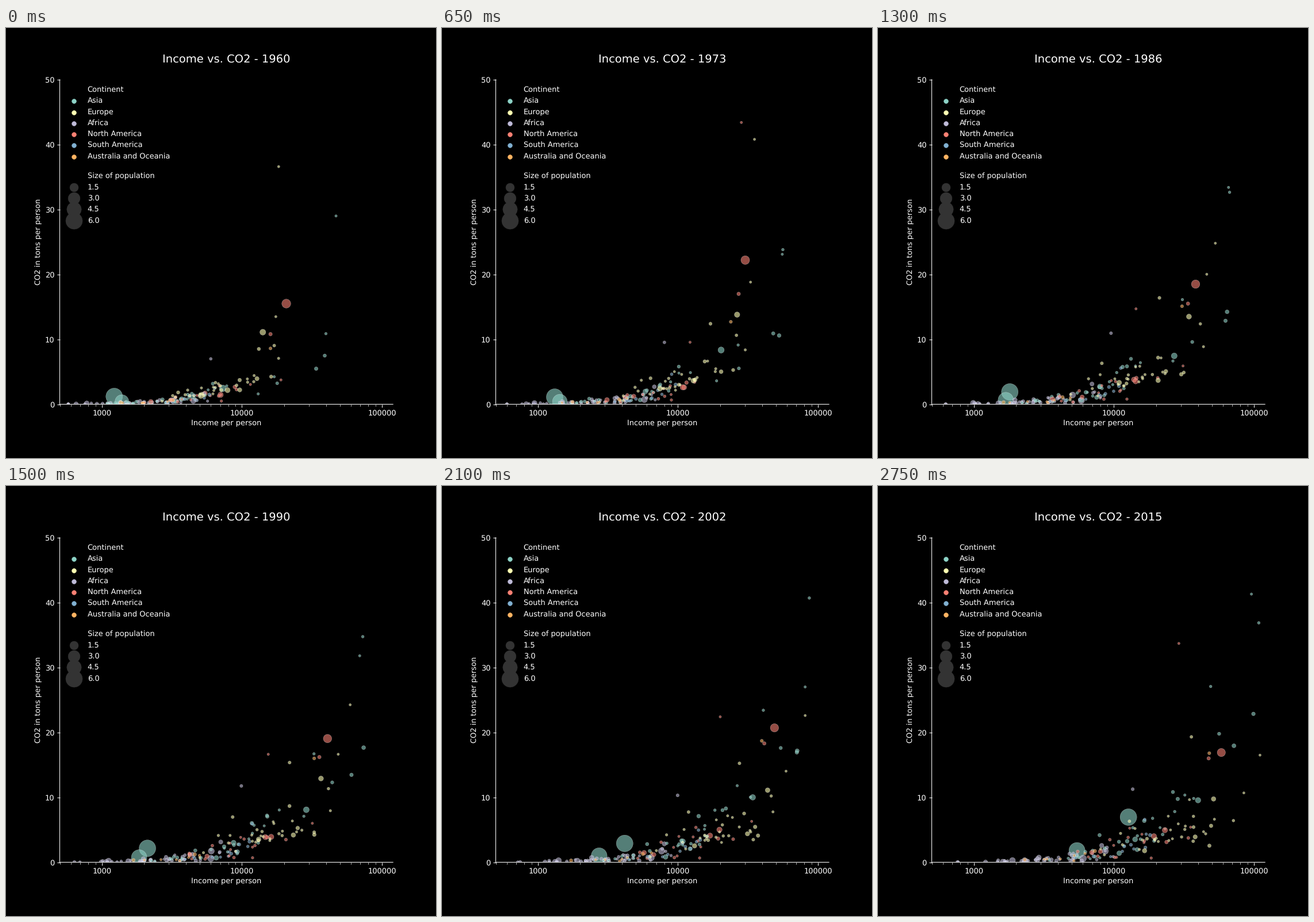
Write a matplotlib script that moves like this. It is 748 px wide and 748 px high and loops after 2800 ms.

```python
import numpy as np
import matplotlib.pyplot as plt
from matplotlib import ticker
from matplotlib.animation import FuncAnimation

SIDE, DPI = 748, 93.5
FIRST_YEAR, YEARS = 1960, 56
T = np.linspace(0, 1, YEARS)

ASIA, EUROPE, AFRICA, NORTH, SOUTH, OCEANIA = range(6)
NAMES = ["Asia", "Europe", "Africa", "North America", "South America",
         "Australia and Oceania"]
COLORS = ["#8dd3c7", "#feffb3", "#bfbbd9", "#fa8174", "#81b1d2", "#fdb462"]

rng = np.random.default_rng(12)
incomes, emissions, people, groups = [], [], [], []


def add(group, log_income, co2, start_pop, end_pop):
    groups.append(group)
    incomes.append(10 ** log_income)
    emissions.append(co2)
    people.append(np.linspace(start_pop, end_pop, YEARS))


def leader(group, pops, start, end, ease, *co2):
    """A country that stands out: eased income, emissions through key years."""
    a, b = np.log10([start, end])
    keys = np.array([0, 13, 26, 42, 55]) / 55
    add(group, a + (b - a) * T ** ease, np.interp(T, keys, co2), *pops)


def crowd(group, count, start, end, spread, levels, noise, growth):
    """Countries that drift along a shared, slowly flattening curve."""
    for _ in range(count):
        walk = rng.normal(0, 0.012, YEARS).cumsum()
        wobble = rng.normal(0, 0.04, YEARS).cumsum()
        z = np.clip(rng.normal(), -1.9, 1.9)
        log_income = start + (end - start) * T ** 0.8 + z * spread + walk
        log_income = np.maximum(log_income, 2.76 + 0.08 * T)
        raw = (3.8 - 1.4 * T) * 10 ** (1.6 * (log_income - 4))
        curve = raw / (1 + raw / (18 - 8 * T))
        level = np.interp(T, [0, 1], levels)
        co2 = level * curve * np.exp(rng.normal(0, noise) + wobble)
        pop = np.clip(0.006 * np.exp(rng.normal(0, 1.1)), 0.001, 0.06)
        add(group, log_income, co2, pop, pop * growth)


leader(ASIA, (.66, 1.4), 1225, 12700, 2.4, 1.2, 1.1, 1.9, 2.9, 6.95)
leader(ASIA, (.45, 1.31), 1390, 5450, 2.6, .4, .4, .65, 1, 1.8)
leader(ASIA, (.094, .127), 7300, 39900, .35, 2.45, 8.35, 7.45, 10, 9.55)
leader(ASIA, (.001, .003), 47000, 96000, 1, 29, 23.1, 33.4, 27, 41.3)
leader(EUROPE, (.073, .082), 14100, 51500, .5, 11.1, 13.8, 13.5, 11.1, 9.75)
leader(EUROPE, (.001, .001), 18300, 110500, .7, 36.6, 40.8, 24.8, 22.6, 16.5)
leader(NORTH, (.18, .32), 20750, 58500, .7, 15.5, 22.2, 18.5, 20.7, 16.9)
leader(NORTH, (.018, .036), 16000, 47500, .5, 10.8, 17, 15.5, 18.3, 16)
leader(NORTH, (.038, .125), 5450, 19300, .4, 1.7, 2.6, 3.8, 4.1, 4)
leader(NORTH, (.001, .001), 19000, 35300, .3, 3.75, 43.4, 5.9, 6.3, 5.4)
leader(NORTH, (.001, .001), 11500, 29100, 1.9, 3.05, 9.55, 14.7, 22.4, 33.7)
leader(OCEANIA, (.01, .024), 16000, 48000, .7, 8.6, 12.7, 15.1, 18.7, 16.8)

crowd(AFRICA, 48, 3.22, 3.5, .29, (.9, .9), .55, 3.5)
crowd(ASIA, 30, 3.38, 4.02, .3, (1, 1.1), .5, 2.6)
crowd(ASIA, 6, 4.35, 4.72, .15, (.6, 2.6), .25, 3)  # oil states
crowd(NORTH, 18, 3.58, 4, .2, (.9, .9), .4, 2)
crowd(SOUTH, 11, 3.66, 4.12, .16, (.9, .9), .35, 2.4)
crowd(EUROPE, 35, 3.88, 4.43, .24, (1.4, 1), .35, 1.3)
crowd(OCEANIA, 8, 3.32, 3.66, .22, (.9, .9), .45, 2)

incomes, emissions, people = map(np.array, (incomes, emissions, people))
areas = 10 + 490 * people / people.max(axis=0)

plt.style.use("dark_background")
plt.rcParams.update({"font.family": "DejaVu Sans", "font.size": 10,
                     "path.snap": False, "text.hinting": "none"})
fig = plt.figure(figsize=(SIDE / DPI, SIDE / DPI), dpi=DPI)
ax = fig.add_axes([0.125, 0.125, 0.775, 0.755])
dots = ax.scatter(incomes[:, 0], emissions[:, 0], s=areas[:, 0],
                  c=[COLORS[g] for g in groups], alpha=0.6,
                  edgecolors="white", linewidths=0.3)

ax.set_xscale("log")
ax.set_xlim(500, 120000)
ax.set_ylim(0, 50)
ax.xaxis.set_major_formatter(ticker.FormatStrFormatter("%d"))
ax.xaxis.set_minor_formatter(ticker.NullFormatter())
ax.spines[["top", "right"]].set_visible(False)
ax.set_xlabel("Income per person")
ax.set_ylabel("CO2 in tons per person")

# Overlay in stage pixels for the title and the legend
stage = fig.add_axes([0, 0, 1, 1])
stage.set_xlim(0, SIDE)
stage.set_ylim(SIDE, 0)
stage.axis("off")
title = stage.text(383.3, 60, "", fontsize=15, ha="center", va="baseline")


def legend_block(heading, top, entries):
    stage.text(141.6, top, heading, va="baseline")
    for row, (label, color, area) in enumerate(entries, 1):
        y = top + 19.3 * row
        stage.text(141.6, y, label, va="baseline")
        stage.scatter(118.3, y - 3.9, s=area, color=color, linewidths=0.4)


legend_block("Continent", 111.8, [(n, c, 36) for n, c in zip(NAMES, COLORS)])
legend_block("Size of population", 261.3,
             [(str(v), "0.2", 10 + 490 * v / 6) for v in (1.5, 3.0, 4.5, 6.0)])


def update(i):
    dots.set_offsets(np.column_stack([incomes[:, i], emissions[:, i]]))
    dots.set_sizes(areas[:, i])
    title.set_text(f"Income vs. CO2 - {FIRST_YEAR + i}")
    return dots, title


anim = FuncAnimation(fig, update, frames=YEARS, interval=50, repeat=True)
plt.show()
```
